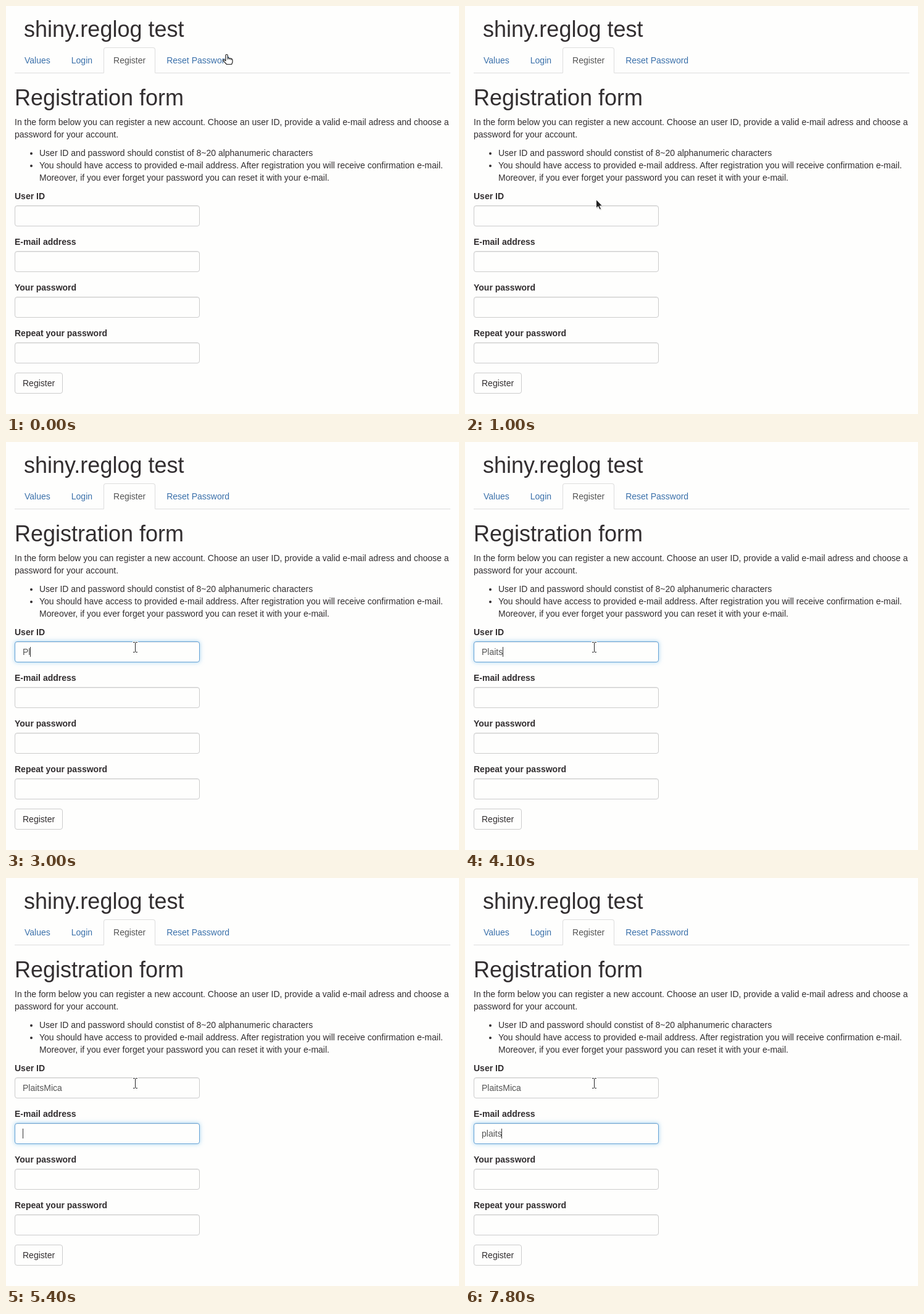
Recreate the animation shown at these times as an HTML page. Size 734 by 661 pixels, loop 8 s.

```html
<!DOCTYPE html>
<html lang="en">
<head>
<meta charset="utf-8">
<title>Registration form</title>
<style>
  * { box-sizing: border-box; }
  html, body { margin: 0; width: 100%; height: 100%; overflow: hidden; background: #fefefd; }
  body { position: relative; font: 14px/20px "Liberation Sans", Arial, sans-serif; color: #322e30; white-space: nowrap; }
  main { position: absolute; left: 14px; top: 18px; width: 706px; }
  h1 { margin: 20px 0 10px; height: 39px; font-size: 36px; line-height: 39px; font-weight: 500; }
  h1.title { margin: 0 0 10px 15px; }
  p { margin: 0 0 10px; }

  nav { display: flex; height: 42px; border-bottom: 1px solid #ddd; }
  nav span { height: 42px; margin-right: 2px; padding: 10px 15px; border: 1px solid transparent;
    border-radius: 4px 4px 0 0; color: #3a70aa; }
  nav .active { color: #555; background: #fefefd; border-color: #ddd #ddd #fefefd; }
  nav .hover { color: #23527c; background: #eee; border-color: #eee #eee #ddd; }

  ul { margin: 0 0 10px; padding-left: 40px; list-style: none; }
  li { position: relative; }
  li::before { content: ""; position: absolute; left: -15px; top: 9px; width: 4px; height: 4px;
    border-radius: 50%; background: #322e30; }

  label { display: block; margin-bottom: 5px; font-weight: bold; }
  .field { position: relative; width: 300px; height: 34px; margin-bottom: 15px; padding: 6px 12px;
    border: 1px solid #ccc; border-radius: 4px; color: #555; background: #fefefd;
    box-shadow: inset 0 1px 1px rgba(0,0,0,.075); }
  .caret { position: absolute; top: 8px; width: 1px; height: 16px; background: #333; }
  .button { display: inline-block; height: 34px; padding: 6px 12px; border: 1px solid #ccc; border-radius: 4px; }

  svg { position: absolute; left: 0; top: 0; overflow: visible; }
</style>
</head>
<body>
<main>
  <h1 class="title">shiny.reglog test</h1>
  <nav><span>Values</span><span>Login</span><span class="active">Register</span><span id="reset">Reset Password</span></nav>
  <h1>Registration form</h1>
  <p>In the form below you can register a new account. Choose an user ID, provide a valid e-mail adress and choose a<br>password for your account.</p>
  <ul>
    <li>User ID and password should constist of 8~20 alphanumeric characters</li>
    <li>You should have access to provided e-mail address. After registration you will receive confirmation e-mail.<br>Moreover, if you ever forget your password you can reset it with your e-mail.</li>
  </ul>
  <label>User ID</label><div class="field" id="user"><span></span><i class="caret"></i></div>
  <label>E-mail address</label><div class="field" id="email"><span></span><i class="caret"></i></div>
  <label>Your password</label><div class="field"></div>
  <label>Repeat your password</label><div class="field"></div>
  <div class="button">Register</div>
</main>

<svg width="1" height="1" stroke-linejoin="round">
  <defs><path id="beamShape" d="M-3 -8H-1L0 -7L1 -8H3M0 -7V7M-3 8H-1L0 7L1 8H3"/></defs>
  <g id="hand" fill="#fff" stroke="#222" stroke-width="1.2">
    <path d="M7.5 1.5C8.6 1.5 9.2 2.2 9.2 3.1V7L14.5 8.2C16.2 8.6 17 9.4 17 11V14L15.6 17.5H7.5L2 11.7C1.2 10.6 2.5 9.2 3.8 10.2L5.9 11.8V3.1C5.9 2.2 6.5 1.5 7.5 1.5Z"/>
    <path d="M9.2 7V10M11.9 7.7V10.2M14.5 8.3V10.6" stroke-width=".9"/>
  </g>
  <g id="arrow">
    <path d="M1.5 2V16L5 13.2L7.2 18L9.6 17L7.6 12.2H12Z" fill="#000" opacity=".15"/>
    <path d="M.5 .5V14.6L3.8 11.7L6.1 16.8L8.5 15.8L6.3 10.9H10.6Z" fill="#222" stroke="#fff" stroke-width=".9"/>
  </g>
  <g id="beam" fill="none" stroke-linecap="square">
    <use href="#beamShape" stroke="#fff" stroke-width="3"/>
    <use href="#beamShape" stroke="#222"/>
  </g>
</svg>

<script>
const LOOP = 8000, TICK = 100;
const $ = id => document.getElementById(id);
const cursors = ["hand", "arrow", "beam"].map($);

// keys: time at which each character appears; hidden: caret-off interval
const fields = [
  { el: $("user"), text: "PlaitsMica", focus: 1500, blur: 5300, hidden: [2100, 2600],
    keys: [2600, 3000, 3200, 3400, 3600, 4100, 4500, 4600, 4800, 5300] },
  { el: $("email"), text: "plaits", focus: 5300, blur: LOOP, hidden: [5900, 6500],
    keys: [6900, 7200, 7300, 7400, 7700, 7800] }
];

const within = (t, from, to) => t >= from && t < to;

function pointerAt(t) {
  if (t < 500) return ["hand", 350, 77];
  if (t < 1200) {
    const u = Math.min((t - 500) / 500, 1), p = 1 - (1 - u) ** 1.5;
    return ["arrow", 341 - 129 * p, 121 + 192 * p];
  }
  if (t < 1300) return ["arrow", 211, 317];
  return ["beam", 209.5, t < 1400 ? 328.5 : t < 1900 ? 331.5 : 332.5];
}

function drawField(f, t) {
  const [span, caret] = f.el.children;
  const focused = within(t, f.focus, f.blur);
  span.textContent = f.text.slice(0, f.keys.filter(k => k <= t).length);
  caret.style.left = 12 + Math.floor(span.getBoundingClientRect().width) + "px";
  caret.style.display = focused && !within(t, ...f.hidden) ? "block" : "none";

  const glow = focused ? Math.min(1, 0.4 + (t - f.focus) / 170) : 0;
  const mix = (a, b) => Math.round(a + (b - a) * glow);
  f.el.style.borderColor = `rgb(${mix(204, 102)},${mix(204, 163)},${mix(204, 214)})`;
  f.el.style.boxShadow =
    `inset 0 1px 1px rgba(0,0,0,.075), 0 0 7px rgba(102,180,233,${0.6 * glow})`;
}

function draw(t) {
  $("reset").className = within(t, 200, 500) ? "hover" : "";
  fields.forEach(f => drawField(f, t));
  const [kind, x, y] = pointerAt(t);
  for (const c of cursors) c.style.display = c.id === kind ? "" : "none";
  $(kind).setAttribute("transform", `translate(${x} ${y})`);
}

function loop() {
  draw(Math.floor(performance.now() % LOOP / TICK) * TICK);
  requestAnimationFrame(loop);
}
loop();
</script>
</body>
</html>
```
